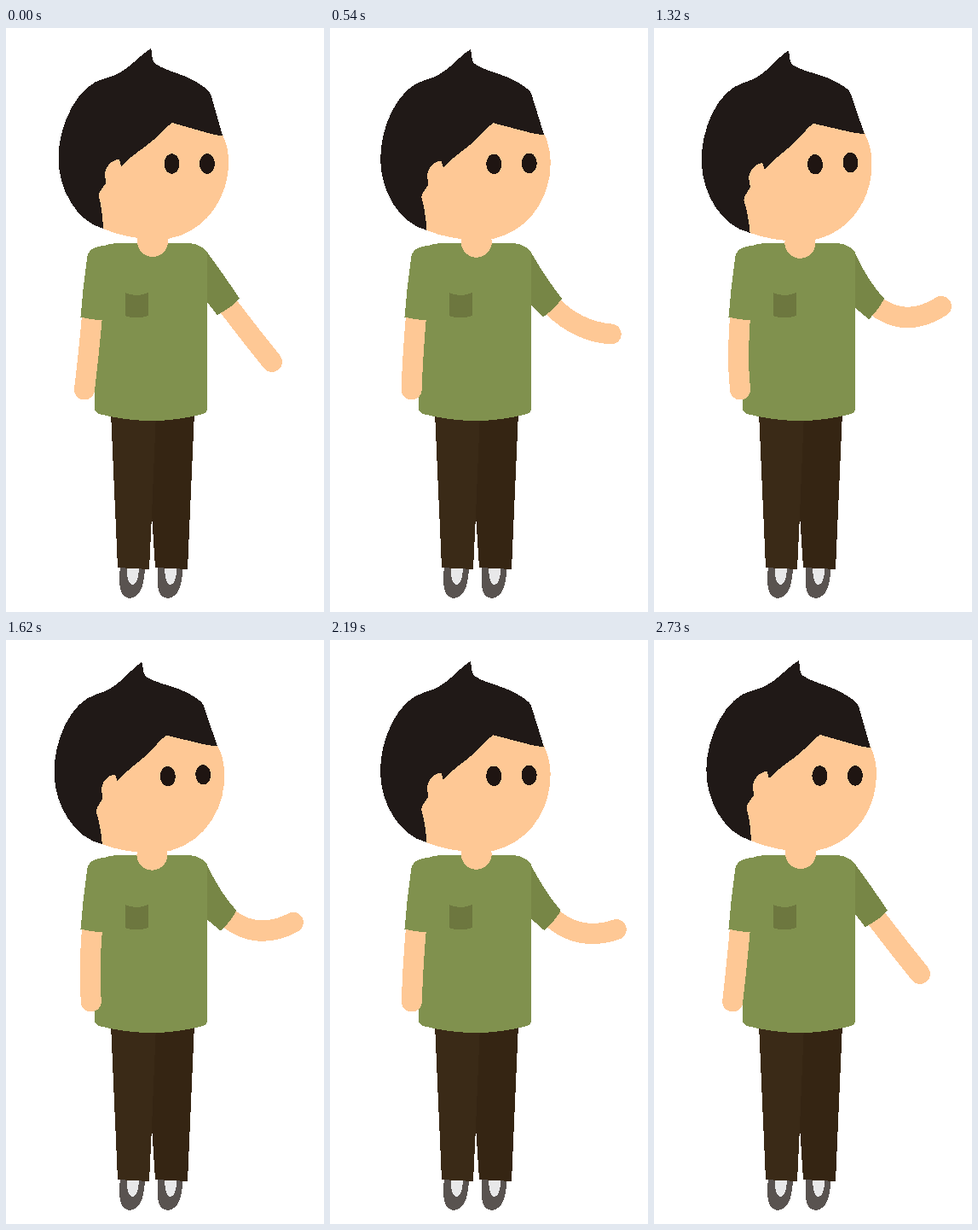
An HTML page for the animation above (2.76 s loop, 373 px wide and 684 px high).

```html
<!DOCTYPE html>
<html lang="en">
<head>
<meta charset="utf-8">
<title>Talking boy</title>
<style>
  html, body { margin: 0; width: 100%; height: 100%; overflow: hidden; background: #fff; }
  svg { display: block; width: 100%; height: 100%; shape-rendering: crispEdges; }
  .arm { fill: none; stroke: #fec895; stroke-width: 24; stroke-linecap: round; }
</style>
</head>
<body>
<svg viewBox="0 0 373 684">
  <!-- shoes and trousers -->
  <g id="shoe">
    <path fill="#595350" d="M134 631 L163 632 Q162 655 155 663 Q146 672 137 664 Q131 655 134 631Z"/>
    <path fill="#e8e8e9" d="M141.500 631 L156 632 Q155 652 148 652 Q142 651 141.500 631Z"/>
  </g>
  <use href="#shoe" x="44.500"/>
  <path fill="#3a2a17" d="M123 450 H177 L171 570 L168 634 L131 632Z"/>
  <path fill="#352513" d="M176 450 H221 L213 634 L175 632 L171 570Z"/>

  <path id="rightArm" class="arm"/>
  <path id="rightSleeve" fill="#778646"/>

  <!-- shirt -->
  <path fill="#80914e" d="M104 258 L114 256 Q120 252 135 252 H214 C224 252 231 256 236 263 V445 Q236 450 231 452 Q172 468 109 452 Q104 450 104 445Z"/>
  <path fill="#6d773f" d="M139.500 310 Q153 316 167 310 V337 Q153 342 139.500 337Z"/>
  <path id="leftArm" class="arm"/>
  <path fill="#80914e" d="M118 255 Q107 255 101 259 Q96 262 95 270 Q90 305 87.500 338.500 Q100 342 114 342Z"/>

  <!-- head -->
  <g id="head">
    <circle cx="172" cy="250" r="18" fill="#fec895"/>
    <path fill="#fec895" d="M254 125 C259 135 261 146 261 157 C261 207 225 247 178 248 C155 248 130 242 114 235 L104 200 L112 160 L150 130 L195 100 L246 110Z"/>
    <path fill="#201917" d="M170 24 C172 29 170 37 174 41 C183 48 199 52 211 57 C222 62 232 68 238 74 Q241 78 242 84 L254 126 Q246 126 230 121 L195 111 C188 115 182 123 173 131 C162 141 148 148 135 162 L133 154 C124 154 116 163 116 172 Q117 179 117 182 Q113 187 112 189 Q108 194 109 198 Q113 212 114 235 C82 226 61 188 61.500 151 C62 113 84 66 116 59 C142 53 151 36 170 24Z"/>
    <g fill="#1f1512">
      <ellipse class="eye" cx="194.500" cy="159"/>
      <ellipse class="eye" cx="236" cy="159"/>
    </g>
  </g>
</svg>
<script>
const LOOP = 2760, STEP = 30;
const LOWER = 2430, REST = 2730;  // arm starts to drop, arm hangs again

const el = id => document.getElementById(id);
const eyes = document.querySelectorAll('.eye');
const mix = (a, b, k) => a + (b - a) * k;
const ramp = (t, from, to) => Math.min(1, Math.max(0, (t - from) / (to - from)));
const easeOut = k => Math.sin(k * Math.PI / 2);

function drawHead(t, sway) {
  el('head').setAttribute('transform', `translate(0 ${1.2 * sway}) rotate(${-3.17 * sway} 185 262)`);
  const open = 1 - .3 * Math.max(0, 1 - Math.abs(t - LOWER) / 90);
  for (const eye of eyes) {
    eye.setAttribute('rx', 9 * open);
    eye.setAttribute('ry', 11.7 * open);
  }
}

function drawRightArm(t) {
  // Rise, sink a little, then drop along an outward arc.
  const drop = ramp(t, LOWER, REST);
  const raise = ramp(t, 0, 1080) - .215 * easeOut(ramp(t, 1380, LOWER)) - .785 * drop;
  const handX = 312 + 25 * easeOut(raise) + 16 * Math.sin(Math.PI * drop);
  const handY = 391 - 65 * raise;
  el('rightArm').setAttribute('d',
    `M261 326 Q${286 + 10 * raise} ${359 - 7 * raise} ${handX} ${handY}`);

  const tipX = 274 - 4 * raise, tipY = 317;
  const hemX = 247.5 + 4.5 * raise, hemY = 336 + 5 * raise;
  el('rightSleeve').setAttribute('d',
    `M234 260 Q${254 - 3 * raise} ${287 + 10 * raise} ${tipX} ${tipY}` +
    ` Q${(tipX + hemX) / 2 + 1} ${(tipY + hemY) / 2 + 3} ${hemX} ${hemY}` +
    ` L236 ${321 + 7 * raise} H234Z`);
}

function draw(now) {
  const t = Math.floor((now % LOOP) / STEP) * STEP;
  const sway = 1 - Math.abs(t / (LOOP / 2) - 1);
  drawHead(t, sway);
  el('leftArm').setAttribute('d', `M101.500 332 Q97 382 ${mix(92, 101.4, sway)} 423.500`);
  drawRightArm(t);
}

const start = performance.now();
function tick() {
  draw(performance.now() - start);
  requestAnimationFrame(tick);
}
tick();
</script>
</body>
</html>
```
